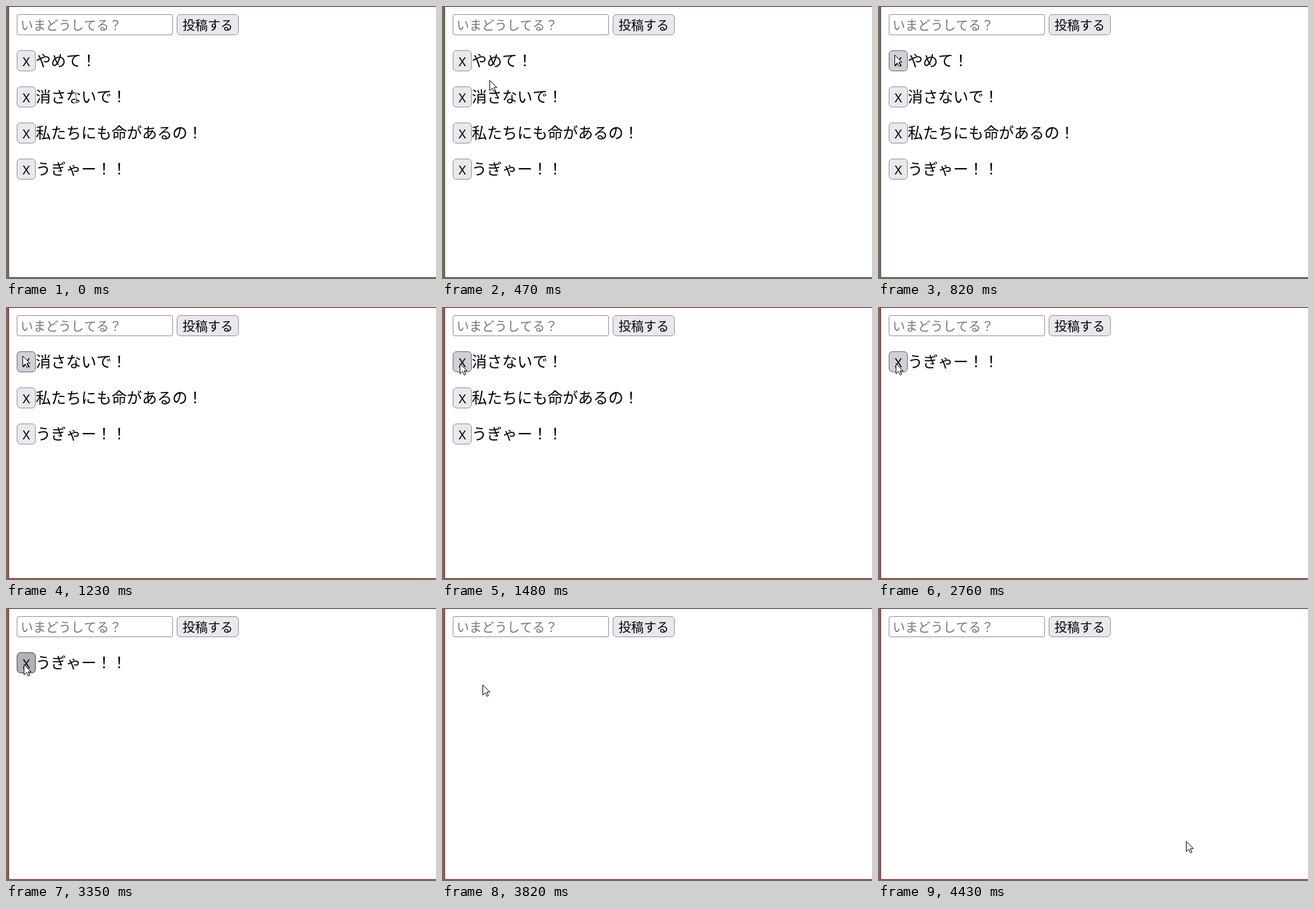
These frames come from a looping animation (680 by 431 pixels, 4.5 s). An HTML page with a canvas:

```html
<!DOCTYPE html>
<html lang="ja">
<head>
<meta charset="utf-8">
<title>投稿リスト</title>
<style>
  html, body { margin: 0; width: 100%; height: 100%; overflow: hidden; background: #fff; }
  canvas { display: block; }
</style>
</head>
<body>
<canvas id="stage" width="680" height="431" lang="ja"></canvas>
<script>
const canvas = document.getElementById('stage');
const ctx = canvas.getContext('2d');
const LOOP = 4500, HOLD = 140, SAMPLE = 68;
const KANA = '"Noto Sans CJK JP", "Noto Sans CJK", sans-serif';
const LATIN = '"Noto Sans", sans-serif';
const ROW_TOP = 70, ROW_STEP = 57, ROW_HEIGHT = 33;
const BUTTON_LEFT = 17, TEXT_LEFT = 47, TEXT_SIZE = 24;

// A click ends at "removed" and takes the post away.
const posts = [
  { text: 'やめて！', removed: 1220 },
  { text: '消さないで！', removed: 2020 },
  { text: '私たちにも命があるの！', removed: 2760 },
  { text: 'うぎゃー！！', removed: 3490 }
];
const focusAt = posts[0].removed - HOLD;

// The pointer glides between these rests.
const start = { x: 110, y: 145 };
const glides = [
  { from: 260, to: 820, x: 26, y: 77 },
  { from: 1280, to: 1480, x: 28, y: 89 },
  { from: 3530, to: 3820, x: 64, y: 121 },
  { from: 3890, to: 4220, x: 405, y: 325 },
  { from: 4380, to: 4430, x: 487, y: 368 }
];

const styles = {
  normal: { fill: '#e9e9ed', line: '#8f8f9d' },
  hover: { fill: '#d0d0d7', line: '#676774' },
  active: { fill: '#b1b1b9', line: '#484851' },
  field: { fill: '#fff', line: '#8f8f9d' }
};

const smooth = p => p * p * (3 - 2 * p);

function pointerAt(t) {
  let { x, y } = start;
  for (const g of glides) {
    if (t < g.from) break;
    const gaps = Math.round((g.to - g.from) / SAMPLE);
    const step = Math.floor((t - g.from) / (g.to - g.from) * gaps + 0.001) + 1;
    const p = smooth(Math.min(1, step / (gaps + 1)));
    x += (g.x - x) * p;
    y += (g.y - y) * p;
  }
  return { x: Math.round(x), y: Math.round(y) };
}

function text(str, x, y, size, { font = KANA, color = '#000', align = 'left' } = {}) {
  ctx.font = `${size}px ${font}`;
  ctx.textAlign = align;
  ctx.fillStyle = color;
  ctx.fillText(str, x, y);
}

function box(x, y, w, h, radius, { fill, line }) {
  ctx.beginPath();
  ctx.roundRect(x + 0.5, y + 0.5, w - 1, h - 1, radius);
  ctx.fillStyle = fill;
  ctx.fill();
  ctx.strokeStyle = line;
  ctx.lineWidth = 1;
  ctx.stroke();
}

function rect(x, y, w, h, color) {
  ctx.fillStyle = color;
  ctx.fillRect(x, y, w, h);
}

function drawWindow(focused) {
  const { width, height } = canvas;
  rect(0, 0, width, height, '#746a5d');
  rect(4, 0, width, height - 2, focused ? '#c4272f' : '#665c50');
  rect(5, 0, width, height - 3, '#fff');
  rect(5, 0, width, 1, '#48000a');
}

function drawForm() {
  box(17, 13, 247, 33, 2.5, styles.field);
  text('いまどうしてる？', 23, 38, 20, { color: '#757575' });
  box(270, 13, 98, 33, 5.5, styles.normal);
  text('投稿する', 319, 38, 20, { align: 'center' });
}

function drawArrow(x, y) {
  ctx.save();
  ctx.translate(x + 0.5, y + 0.5);
  const shape = new Path2D('M0 0V16L4 12.3L6.6 18L9 17L6.5 11.3H11.3Z');
  ctx.fillStyle = '#fff';
  ctx.fill(shape);
  ctx.strokeStyle = '#000';
  ctx.lineWidth = 1;
  ctx.stroke(shape);
  ctx.restore();
}

// The text cursor inverts whatever lies under it.
function drawBeam(x, y) {
  ctx.save();
  ctx.globalCompositeOperation = 'difference';
  rect(x, y - 7, 1, 14, '#fff');
  for (const edge of [y - 8, y + 7]) {
    rect(x - 3, edge, 3, 1, '#fff');
    rect(x + 1, edge, 3, 1, '#fff');
  }
  ctx.restore();
}

function draw(t) {
  const { x, y } = pointerAt(t);
  const pressed = posts.some(p => t >= p.removed - HOLD && t < p.removed);
  let overText = false;

  drawWindow(t >= focusAt);
  drawForm();
  posts.filter(p => t < p.removed).forEach((post, i) => {
    const top = ROW_TOP + i * ROW_STEP;
    const inRow = y >= top && y < top + ROW_HEIGHT;
    const hover = inRow && x >= BUTTON_LEFT && x < TEXT_LEFT;
    const state = !hover ? 'normal' : pressed ? 'active' : 'hover';
    box(BUTTON_LEFT, top, TEXT_LEFT - BUTTON_LEFT, ROW_HEIGHT, 5.5, styles[state]);
    text('X', 32, top + 25, 20, { font: LATIN, align: 'center' });
    text(post.text, TEXT_LEFT, top + 25, TEXT_SIZE);
    overText ||= inRow && x >= TEXT_LEFT && x < TEXT_LEFT + post.text.length * TEXT_SIZE;
  });
  (overText ? drawBeam : drawArrow)(x, y);
}

const begin = performance.now();
function frame() {
  draw((performance.now() - begin) % LOOP);
  requestAnimationFrame(frame);
}
frame();
</script>
</body>
</html>
```
